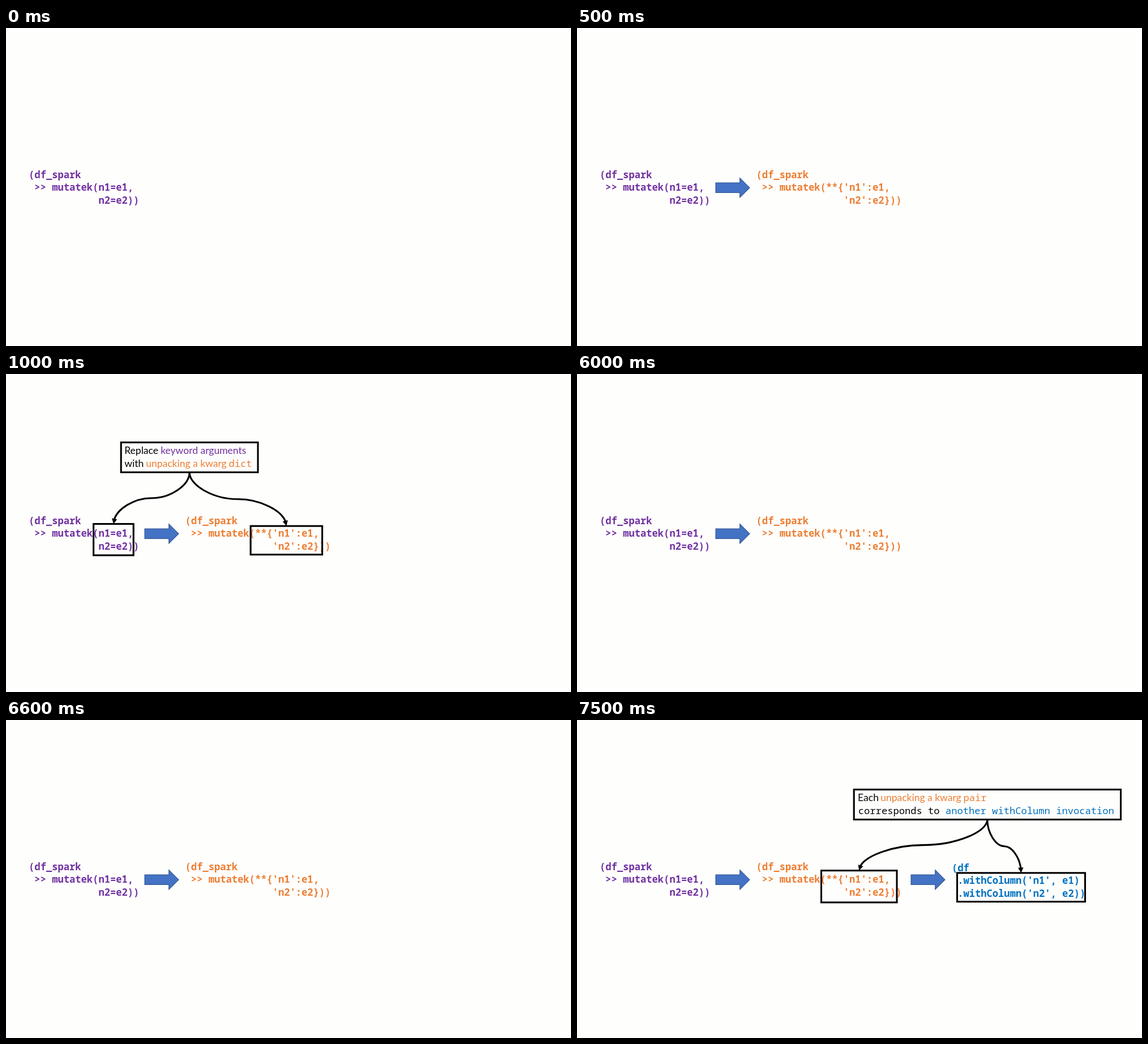
Write an HTML page that moves like this. It is 998x561 px and loops after 8000 ms.

```html
<!DOCTYPE html>
<html lang="en">
<head>
<meta charset="utf-8">
<title>Keyword arguments to withColumn</title>
<style>
  html, body { margin: 0; width: 100%; height: 100%; overflow: hidden; background: #fefefd; }
  svg { display: block; width: 998px; height: 561px; }
  text { white-space: pre; font: 17.5px Lato, Carlito, sans-serif; }
  .code, .mono { font: 17.145px "Noto Sans Mono", "DejaVu Sans Mono", monospace; }
  .code { font-weight: 700; }
  .purple { fill: #7030a0; }
  .orange { fill: #ed7d31; }
  .blue { fill: #0070c0; }
  .block-arrow { fill: #4472c4; stroke: #2f528f; stroke-width: 1.04; }
  .note rect, .link { fill: none; stroke: #000; stroke-width: 3.1; }

  .step { visibility: hidden; animation: 8s step-end infinite; }
  .unpacked { animation-name: unpacked; }
  .replace { animation-name: replace; }
  .columns { animation-name: columns; }
  .pairs { animation-name: pairs; }
  @keyframes unpacked { 0% { visibility: hidden } 6.25%, 100% { visibility: visible } }
  @keyframes replace { 0%, 75%, 100% { visibility: hidden } 12.5% { visibility: visible } }
  @keyframes columns { 0% { visibility: hidden } 87.5%, 100% { visibility: visible } }
  @keyframes pairs { 0% { visibility: hidden } 93.75%, 100% { visibility: visible } }
</style>
</head>
<body>
<svg viewBox="0 0 998 561">
  <defs>
    <path id="arrow" class="block-arrow" d="M245 273h42.7v-8.6l17.3 17.3l-17.3 17.3v-8.6h-42.7z"/>
  </defs>

  <text class="code purple" y="264.6"><tspan x="40.1">(df_spark</tspan><tspan x="40.1" dy="22.45"> >> mutatek(n1=e1,</tspan><tspan x="40.1" dy="22.45">            n2=e2))</tspan></text>

  <g class="step unpacked">
    <use href="#arrow"/>
    <text class="code orange" y="264.6"><tspan x="316.6">(df_spark</tspan><tspan x="316.6" dy="22.45"> >> mutatek(**{'n1':e1,</tspan><tspan x="316.6" dy="22.45">               'n2':e2}))</tspan></text>
  </g>

  <g class="step columns">
    <use href="#arrow" x="345"/>
    <text class="code blue" y="267"><tspan x="661.9">(df</tspan><tspan x="661.9" dy="22.45"> .withColumn('n1', e1)</tspan><tspan x="661.9" dy="22.45"> .withColumn('n2', e2))</tspan></text>
  </g>

  <g class="step note replace">
    <rect x="203.2" y="120.7" width="241.8" height="52.7"/>
    <rect x="154.6" y="264.5" width="70.6" height="55.3"/>
    <rect x="432.1" y="268.2" width="126.5" height="50.4"/>
    <text x="209.2" y="141">Replace</text>
    <text x="273.2" y="141" class="purple">keyword arguments</text>
    <text x="209.2" y="163.5">with</text>
    <text x="247.2" y="163.5" class="orange">unpacking a kwarg</text>
    <text x="393.4" y="163.5" class="mono orange">dict</text>
  </g>

  <g class="step note pairs">
    <rect x="489.2" y="122.7" width="471.3" height="52.9"/>
    <rect x="431.5" y="265.6" width="133.5" height="56.2"/>
    <rect x="671.5" y="269.8" width="226" height="50.7"/>
    <text x="496.1" y="143.4">Each</text>
    <text x="536.2" y="143.4" class="orange">unpacking a kwarg</text>
    <text x="682.4" y="143.4" class="mono orange">pair</text>
    <text x="496.8" y="165.9" class="mono">corresponds to <tspan class="blue">another withColumn invocation</tspan></text>
  </g>
</svg>
<script>
  const HEAD = 9.4;

  function addPath(parent, attributes) {
    const path = document.createElementNS('http://www.w3.org/2000/svg', 'path');
    for (const name in attributes) path.setAttribute(name, attributes[name]);
    return parent.appendChild(path);
  }

  // S-shaped connector that leaves and arrives vertically, with a triangular head.
  function connect(selector, x0, y0, x1, y1) {
    const group = document.querySelector(selector);
    const x = f => x0 + (x1 - x0) * f;
    const y = f => y0 + (y1 - y0) * f;
    const link = addPath(group, {
      class: 'link',
      d: `M${x0} ${y0}C${x0} ${y(.25)} ${x(.25)} ${y(.5)} ${x(.5)} ${y(.5)}` +
         `S${x1} ${y(.75)} ${x1} ${y1}`
    });
    const length = link.getTotalLength();
    const back = link.getPointAtLength(length - HEAD);
    const angle = Math.atan2(y1 - back.y, x1 - back.x) * 180 / Math.PI;
    link.setAttribute('stroke-dasharray', `${length - HEAD * .7} ${length}`);
    addPath(group, {
      d: `M0 0L${-HEAD} ${-HEAD / 2}V${HEAD / 2}z`,
      transform: `translate(${x1} ${y1}) rotate(${angle})`
    });
  }

  connect('.replace', 324.1, 173.4, 189.9, 264.5);
  connect('.replace', 324.1, 173.4, 495.3, 268.2);
  connect('.pairs', 724.8, 175.6, 498.2, 265.6);
  connect('.pairs', 724.8, 175.6, 784.5, 269.8);
</script>
</body>
</html>
```
